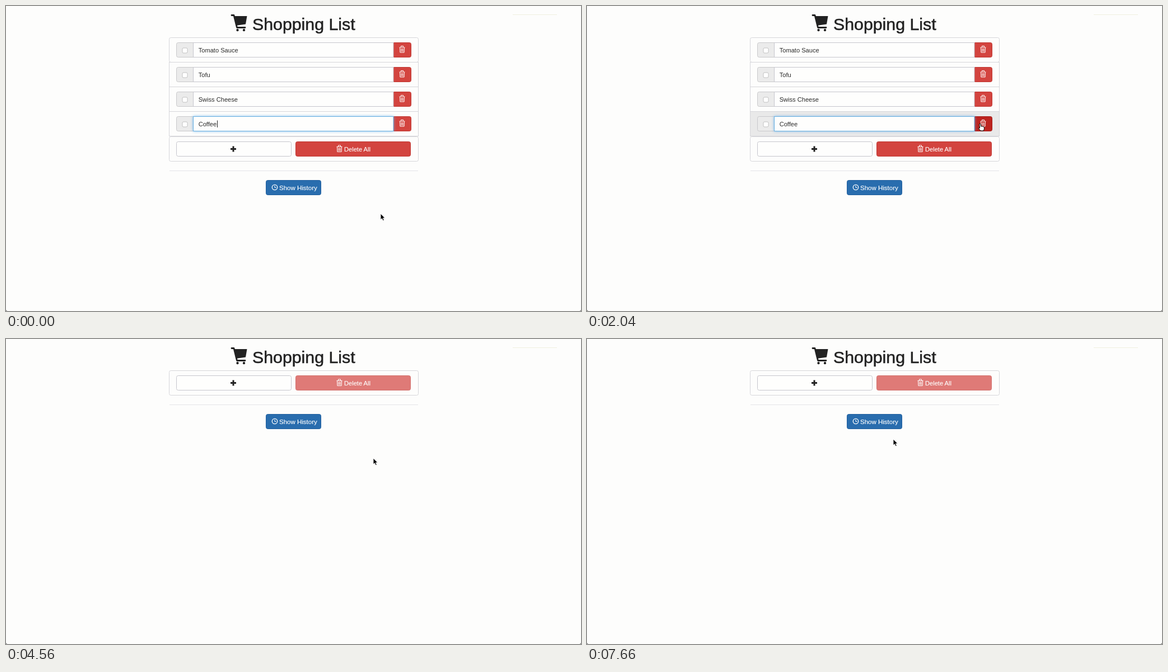
These frames come from a looping animation (1027 px wide and 545 px high, 7680 ms). An HTML page:

```html
<!DOCTYPE html>
<html lang="en">
<head>
<meta charset="utf-8">
<title>Shopping List</title>
<style>
html, body { margin: 0; width: 100%; height: 100%; overflow: hidden; background: #fdfdfc; }
svg { display: block; width: 1027px; height: 545px; font: 11.1px "Liberation Sans", Arial, sans-serif; fill: #2b2b2b; }
.panel { fill: none; stroke: #d6d6da; }
.field { fill: #fefefd; stroke: #c6c6cd; }
.addon { fill: #ebebeb; stroke: #c9c9cb; }
.red { fill: #d3443f; stroke: #c03732; }
.red.hot { fill: #bd2420; stroke: #a51d1a; }
.blue { fill: #296dae; stroke: #215f9e; }
.focus { fill: #fefefd; stroke: #66afe0; filter: drop-shadow(0 0 2.5px rgba(102, 175, 233, .75)); }
.white { fill: #fff; stroke: #fff; stroke-width: .15; }
.line { fill: none; stroke: #fff; }
.off { opacity: .7; }
</style>
</head>
<body>
<svg viewBox="0 0 1027 545">
  <defs>
    <g id="trash" class="line">
      <path d="M-5 -3.5H5M-2 -4V-6H2V-4M-4 -3L-3.6 5.5H3.6L4 -3" />
      <path d="M-1.8 -1.5V4M0 -1.5V4M1.8 -1.5V4" stroke-width=".9" />
    </g>
  </defs>

  <path d="M905 15.5H984" stroke="#efefdf" />
  <path d="M0 542Q0 545 3 545H0ZM1027 542Q1027 545 1024 545H1027Z" fill="#555" />

  <path d="M403 16.5H407L412.5 38.5H427" fill="none" stroke="#222" stroke-width="2.8" stroke-linecap="round" stroke-linejoin="round" />
  <path d="M407 18H430.5L428 32.5L410.5 35Z" fill="#222" />
  <circle cx="413.5" cy="43" r="2.2" fill="#222" />
  <circle cx="425" cy="43" r="2.2" fill="#222" />
  <text x="440" y="43" font-size="30.3" fill="#222" stroke="#222" stroke-width=".55">Shopping List</text>

  <g id="rows"></g>

  <g id="footer">
    <rect class="panel" x="291.5" y="56.5" width="445" height="44" rx="3" />
    <rect class="field" x="304.5" y="65.5" width="205" height="26" rx="3" />
    <path d="M401 78.5H411M406 73.5V83.5" stroke="#222" stroke-width="3" />
    <g id="clear">
      <rect class="red" x="517.5" y="65.5" width="205" height="26" rx="3" />
      <use href="#trash" x="595.5" y="78" />
      <text class="white" x="604" y="82.5">Delete All</text>
    </g>
    <path d="M292 117.5H736" stroke="#e4e4e8" />
    <rect class="blue" x="464.5" y="134.5" width="98" height="26" rx="3" />
    <circle class="line" cx="480" cy="147" r="4.7" stroke-width="1.3" />
    <path class="line" d="M480 144V147.5H482.5" />
    <text class="white" x="488" y="151.5" font-size="11.5">Show History</text>
  </g>

  <path id="arrow" d="M0 0V11L2.5 8.7L4.3 12.6L6.3 11.7L4.6 7.9H8Z" fill="#000" stroke="#fff" stroke-width=".9" />
  <path id="hand" d="M-1.2 0Q0 -1.2 1.1 0L1.7 4.2Q3 3.2 3.8 4.4Q5 3.6 5.8 4.9Q7.4 4.6 7.5 6.3L7.2 9.5L6.2 12H1L-2.7 7.6Q-2.6 6 -.4 7.2Z" fill="#fff" stroke="#000" />
</svg>
<script>
const LOOP = 7680, DELETE_ONE = 2400, DELETE_ALL = 4560;
const items = ["Tomato Sauce", "Tofu", "Swiss Cheese", "Coffee"];
const $ = id => document.getElementById(id);

// pointer stops: time, x, y
const stops = [
  [0, 669, 371], [200, 669, 371], [860, 712, 280], [1450, 705, 212],
  [2040, 702, 211], [2600, 702, 211], [3400, 657, 272], [3800, 657, 272],
  [4300, 656, 213], [4750, 656, 213], [5220, 656, 222], [6180, 538, 248],
  [6500, 537, 248], [7400, 547, 179], [7680, 547, 179]
];

$("rows").innerHTML = items.map((name, i) => `
  <g transform="translate(0 ${44 * i})">
    <rect class="panel" x="291.5" y="56.5" width="445" height="44" rx="${i ? 0 : 3}"/>
    <path class="addon" d="M334.5 65.5H307.5Q304.5 65.5 304.5 68.5V88.5Q304.5 91.5 307.5 91.5H334.5Z"/>
    <rect x="315" y="75" width="9" height="9" rx="2" fill="#fff" stroke="#b5b5b5" stroke-width=".8"/>
    <path class="red" d="M692.5 65.5H720.5Q723.5 65.5 723.5 68.5V88.5Q723.5 91.5 720.5 91.5H692.5Z"/>
    <use href="#trash" x="707.5" y="77.5"/>
    <rect class="${i == 3 ? "focus" : "field"}" x="334.5" y="65.5" width="357.5" height="26"/>
    <text x="343.7" y="82.5">${name}</text>
    ${i == 3 ? '<path id="caret" d="M377.5 72.5V85" stroke="#222"/>' : ""}
  </g>`).join("");
const rows = [...$("rows").children];

function pointerAt(t) {
  const i = stops.findIndex(s => s[0] > t);
  const [t0, x0, y0] = stops[i - 1], [t1, x1, y1] = stops[i];
  const u = (t - t0) / (t1 - t0), e = u * u * (3 - 2 * u);
  return [x0 + (x1 - x0) * e, y0 + (y1 - y0) * e];
}

const show = (el, on) => el.style.display = on ? "" : "none";

function draw(t) {
  const count = t < DELETE_ONE ? 4 : t < DELETE_ALL ? 3 : 0;
  const shift = Math.round(44.2 * count);
  const [x, y] = pointerAt(t);
  const inside = (l, top, r, b) => x >= l && x <= r && y >= top && y <= b;

  let hand = false;
  rows.forEach((row, i) => {
    const top = 56.5 + 44 * i;
    const over = inside(292, top, 736, top + 44);
    const hot = inside(692, top + 9, 723, top + 35);
    show(row, i < count);
    row.querySelector(".panel").style.fill = over ? "#e9e9e9" : "";
    row.querySelector(".red").classList.toggle("hot", hot);
    hand ||= hot && i < count;
  });

  const overClear = count > 0 && inside(517, 65 + shift, 723, 92 + shift);
  $("footer").setAttribute("transform", `translate(0 ${shift})`);
  $("clear").classList.toggle("off", !count);
  $("clear").firstElementChild.classList.toggle("hot", overClear);
  hand ||= overClear;

  show($("caret"), t < 600 || Math.floor((t - 600) / 530) % 2 == 1);
  for (const id of ["arrow", "hand"]) {
    $(id).setAttribute("transform", `translate(${x} ${y})`);
    show($(id), hand == (id == "hand"));
  }
}

const start = performance.now();
function tick() {
  draw((performance.now() - start) % LOOP);
  requestAnimationFrame(tick);
}
tick();
</script>
</body>
</html>
```
